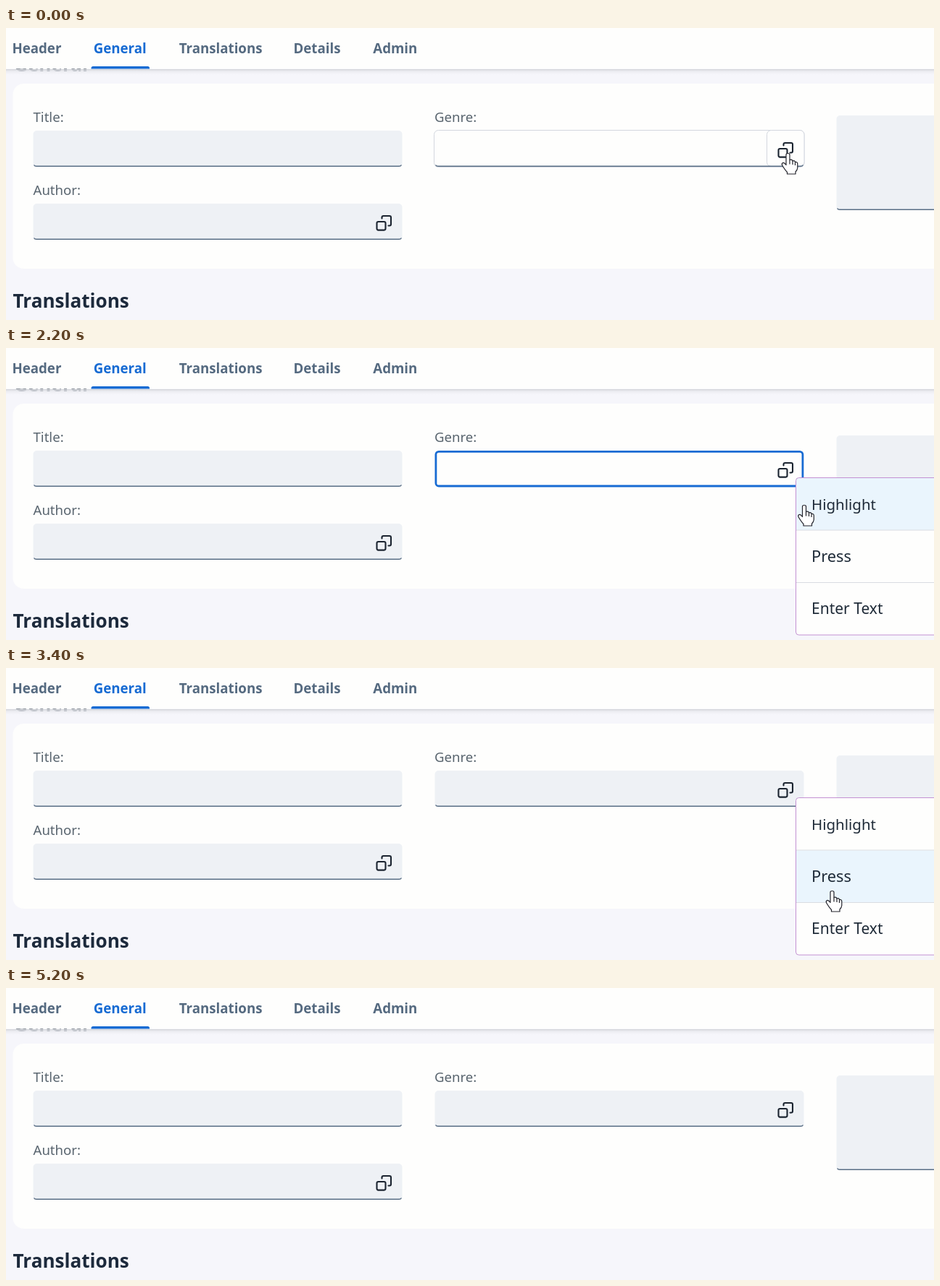
These frames come from a looping animation (1280x404 px, 5400 ms). An HTML page:

```html
<!DOCTYPE html>
<html lang="en">
<head>
<meta charset="utf-8">
<title>Form control menu</title>
<style>
  html, body { margin: 0; width: 100%; height: 100%; overflow: hidden; background: #f6f6fb; }
  svg { display: block; width: 100%; height: 100%; font-family: "Noto Sans", sans-serif; }
  .bold { font-weight: 700; }
  .tabs { font-size: 18.7px; fill: #556a80; }
  .labels { font-size: 18.6px; fill: #59656f; }
  .heading { font-size: 26.1px; fill: #1d2a3c; }
  .menu-text { fill: #1f2b38; }
  .field { fill: #eef1f5; }
  .underline { fill: none; stroke: #596e85; stroke-width: 1.5; }
  .icon { fill: none; stroke: #1b2430; stroke-width: 2.1; stroke-linecap: round; }
  .cursor { fill: #fff; stroke: #22232b; stroke-width: 1.2; stroke-linejoin: round; }
</style>
</head>
<body>
<svg viewBox="0 0 1280 404">
  <defs>
    <linearGradient id="shade" x2="0" y2="1">
      <stop stop-color="#cfd1d6"/>
      <stop offset=".3" stop-color="#e6e7ec" stop-opacity=".8"/>
      <stop offset="1" stop-color="#f0f0f5" stop-opacity="0"/>
    </linearGradient>
    <g id="valueHelp" class="icon">
      <rect x="1" y="9" width="12" height="11.6" rx="2"/>
      <path d="M8 4.5V3q0-2 2-2h8.5q2 0 2 2v9.5q0 2-2 2h-1.5"/>
    </g>
    <g id="input">
      <rect class="field" width="509" height="50" rx="5"/>
      <path class="underline" d="M1 47.5q1 1.8 3.5 1.8h500q2.500 0 3.500-1.800"/>
    </g>
  </defs>

  <rect width="1280" height="404" fill="#f6f6fb"/>
  <text class="bold heading" x="11" y="59.500">General</text>
  <rect y="57" width="1280" height="8" fill="url(#shade)"/>
  <rect width="1280" height="56.500" fill="#fefefd"/>
  <g class="bold tabs">
    <text x="8.400" y="35">Header</text>
    <text x="120.700" y="35" fill="#176bd3">General</text>
    <text x="238.700" y="35">Translations</text>
    <text x="396.500" y="35">Details</text>
    <text x="506.300" y="35">Admin</text>
  </g>
  <path d="M117.500 56.500v-1q0-2.500 2.500-2.500h75.500q2.500 0 2.500 2.500v1z" fill="#176bd3"/>

  <rect x="9.500" y="77" width="1300" height="256" rx="15" fill="#fefefd"/>
  <g class="labels">
    <text x="37.500" y="129.500">Title:</text>
    <text x="591" y="129.500">Genre:</text>
    <text x="37.500" y="230.500">Author:</text>
  </g>
  <use href="#input" x="37.500" y="142"/>
  <use href="#input" x="37.500" y="243"/>
  <use href="#valueHelp" x="510.500" y="259"/>
  <rect class="field" x="1145.500" y="121" width="160" height="131" rx="5"/>
  <path class="underline" d="M1146.500 249.500q1 1.800 3.500 1.800h150"/>
  <text class="bold heading" x="9.500" y="387">Translations</text>

  <g id="plain"><use href="#input" x="591.500" y="142"/></g>
  <g id="hover" fill="#fefefd" stroke="#d3d7df">
    <rect x="590.500" y="141.500" width="510.500" height="51" rx="6"/>
    <rect x="1049.500" y="141.500" width="51.500" height="50" rx="6"/>
    <path class="underline" d="M592.500 189.500q1 1.800 3.500 1.800h500q2.500 0 3.500-1.800"/>
  </g>
  <rect id="focus" x="592.900" y="143.300" width="506" height="47.700" rx="4" fill="#fefefd" stroke="#176bd3" stroke-width="2.800"/>
  <path id="divider" d="M1049.500 145v44" stroke="#d8dce2"/>
  <use href="#valueHelp" x="1064.500" y="158"/>
  <rect id="marker" x="1050.500" y="142.500" width="49.500" height="48" fill="#0000c8" fill-opacity=".6" stroke="#1515c4"/>

  <g id="menu">
    <rect x="1089.500" y="179.500" width="220" height="217.500" rx="4" fill="#fefefd"/>
    <rect id="activeRow" x="1090" width="200" height="72" fill="#eaf5fd"/>
    <path d="M1090 252h190M1090 324.500h190" stroke="#d9dce1"/>
    <rect x="1089.500" y="179.500" width="220" height="217.500" rx="4" fill="none" stroke="#c391d2"/>
    <g class="menu-text">
      <text x="1111" y="223.500" font-size="20.500">Highlight</text>
      <text x="1111" y="295.500" font-size="21.800">Press</text>
      <text x="1111" y="368" font-size="21">Enter Text</text>
    </g>
  </g>

  <g id="hand" class="cursor">
    <path d="M-2.500 2.500Q-2.500.5 0 .5T2.500 2.500V9.500Q6 8.500 6.500 11Q9.500 10 10 12.500Q13.300 12 13.300 15V20.500Q13 23.500 10.500 26V29H-1V26.500Q-4 23.500-7.800 17Q-9 14.500-7 13.500Q-5 13-2.500 16.500Z"/>
    <path d="M2.500 9.500v6M6.500 11v5M10 12.500v4.500" fill="none"/>
  </g>
  <path id="arrow" class="cursor" d="M.5.5V22.500L5.500 18L8.700 25L12 23.500L8.900 16.700H15.500Z"/>
  <rect id="corner" width="1" height="1"/>
</svg>
<script>
  const LOOP = 5400;
  const $ = id => document.getElementById(id);
  const show = (id, on) => $(id).setAttribute("visibility", on ? "visible" : "hidden");
  const between = (t, from, to) => t >= from && t < to;
  const latest = (keys, t) => keys.filter(key => key[0] <= t).pop();

  // start time, pointer, x, y
  const pointerKeys = [
    [0, "hand", 1078.5, 173],
    [1200, "hand", 1082.5, 172],
    [2200, "hand", 1101, 217],
    [2400, "hand", 1117, 271],
    [2600, "hand", 1135.5, 297],
    [2800, "hand", 1139.5, 308],
    [3600, "arrow", 1140, 308],
    [4400, "arrow", 1132, 338],
    [4600, "arrow", 1119.5, 370],
    [4800, "arrow", 1107, 399],
    [5000, "none", 0, 0]
  ];

  function render(t) {
    show("hover", t < 1600);
    show("focus", between(t, 1600, 3400));
    show("divider", between(t, 1600, 2200));
    show("plain", t >= 3400);
    show("marker", between(t, 3600, 4400));

    $("menu").style.display = between(t, 1600, 3600) ? "" : "none";
    show("activeRow", t >= 2200);
    $("activeRow").setAttribute("y", t < 2400 ? 180 : 252.5);

    const [, pointer, x, y] = latest(pointerKeys, t);
    for (const id of ["hand", "arrow"]) {
      show(id, id === pointer);
      $(id).setAttribute("transform", `translate(${x} ${y})`);
    }
    show("corner", between(t, 400, 1000) || between(t, 1400, 2000) || between(t, 3800, 4000));
  }

  const start = performance.now();
  function tick() {
    render((performance.now() - start) % LOOP);
    requestAnimationFrame(tick);
  }
  tick();
</script>
</body>
</html>
```
